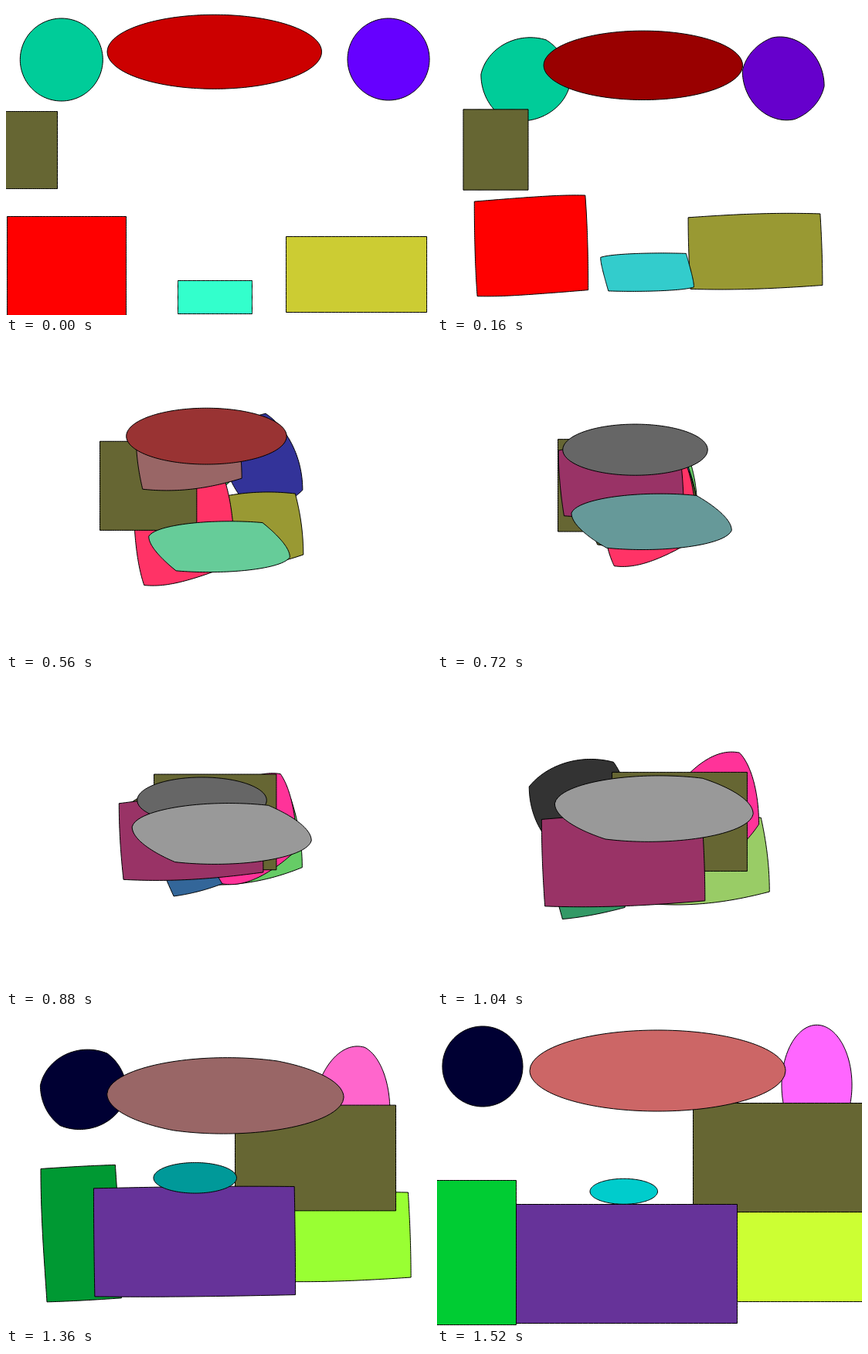
Write an HTML page with a canvas that moves like this. It is 550x400 px and loops after 1.68 s.

```html
<!DOCTYPE html>
<html lang="en">
<head>
<meta charset="utf-8">
<title>Shape morphs</title>
<style>
html, body { margin: 0; width: 100%; height: 100%; overflow: hidden; background: #fff; }
canvas { display: block; }
</style>
</head>
<body>
<canvas id="stage" width="550" height="400"></canvas>
<script>
const ctx = document.getElementById('stage').getContext('2d');
const STEP = 80, LAST = 19, LOOP = 1680, PER_SIDE = 40;

const rect = (l, t, r, b, color) => ({ kind: 'rect', l, t, r, b, color });
const oval = (l, t, r, b, color) => ({ kind: 'oval', l, t, r, b, color });
const mix = (a, b, k) => a + (b - a) * k;

// Start and end of every morph, bottom layer first.
const morphs = [
  [oval(18.3, 16, 125.3, 123, 0x00cc99), rect(385, 251.5, 571, 368.5, 0xccff33)],
  [oval(442, 16, 548, 122, 0x6600ff), rect(-1.7, 211.5, 102.5, 398.5, 0x00cc33)],
  [rect(362.5, 298.5, 544.5, 396.5, 0xcccc33), oval(7, 12, 111, 116, 0x000033)],
  [rect(1.5, 272.5, 155.5, 400.5, 0xff0000), oval(446, 10.3, 537, 166, 0xff66ff)],
  [rect(-1, 136.5, 66.5, 236.5, 0x666633), rect(331.5, 111.5, 556, 252.5, 0x666633)],
  [oval(206.5, 21, 256.5, 71, 0xcc6633), rect(102.5, 242.5, 388.5, 396.5, 0x663399)],
  [oval(131, 11.3, 408.5, 107.3, 0xcc0000), oval(198, 209.3, 285.5, 242.3, 0x00cccc)],
  [rect(222.5, 355.5, 318.5, 398.5, 0x33ffcc), oval(120, 17, 451, 122, 0xcc6666)],
];

// Points clockwise from the top left corner, the same count on each side.
function rectPoints({ l, t, r, b }) {
  const corners = [[l, t], [r, t], [r, b], [l, b]];
  return corners.flatMap(([x, y], i) => {
    const [nx, ny] = corners[(i + 1) % 4];
    return Array.from({ length: PER_SIDE }, (_, j) =>
      [mix(x, nx, j / PER_SIDE), mix(y, ny, j / PER_SIDE)]);
  });
}

// Share of the perimeter covered at each point of rectPoints.
function rectShares({ l, t, r, b }) {
  const split = (r - l) / (r - l + b - t) / 2;
  const stops = [0, split, 0.5, 0.5 + split, 1];
  return Array.from({ length: 4 * PER_SIDE }, (_, i) => {
    const side = Math.floor(i / PER_SIDE);
    return mix(stops[side], stops[side + 1], (i % PER_SIDE) / PER_SIDE);
  });
}

// Points clockwise from the leftmost one, at given shares of the arc length.
function ovalPoints({ l, t, r, b }, shares) {
  const rx = (r - l) / 2, ry = (b - t) / 2, count = 1440;
  const at = i => {
    const angle = Math.PI + 2 * Math.PI * i / count;
    return [l + rx + rx * Math.cos(angle), t + ry + ry * Math.sin(angle)];
  };
  const lengths = [0];
  for (let i = 1; i <= count; i++) {
    const [x, y] = at(i), [px, py] = at(i - 1);
    lengths.push(lengths[i - 1] + Math.hypot(x - px, y - py));
  }
  let i = 0;
  return shares.map(share => {
    const goal = share * lengths[count];
    while (lengths[i + 1] < goal) i++;
    return at(i + (goal - lengths[i]) / (lengths[i + 1] - lengths[i]));
  });
}

const even = Array.from({ length: 4 * PER_SIDE }, (_, i) => i / (4 * PER_SIDE));
const paths = morphs.map(pair => {
  const box = pair.find(shape => shape.kind === 'rect');
  const shares = box ? rectShares(box) : even;
  return pair.map(s => s.kind === 'rect' ? rectPoints(s) : ovalPoints(s, shares));
});

// Colours snap to the six levels of the web palette.
const limits = [32, 80, 128, 192, 240];
function blend(a, b, k) {
  const channels = [16, 8, 0].map(shift => {
    const value = mix(a >> shift & 255, b >> shift & 255, k);
    return 51 * limits.filter(limit => value >= limit).length;
  });
  return `rgb(${channels})`;
}

function draw(now) {
  const k = Math.min(LAST, Math.floor(now % LOOP / STEP)) / LAST;
  ctx.fillStyle = '#fff';
  ctx.fillRect(0, 0, 550, 400);
  ctx.strokeStyle = '#000';
  ctx.lineJoin = 'round';
  morphs.forEach(([from, to], i) => {
    const [start, end] = paths[i];
    ctx.beginPath();
    start.forEach(([x, y], j) => ctx.lineTo(mix(x, end[j][0], k), mix(y, end[j][1], k)));
    ctx.closePath();
    ctx.fillStyle = blend(from.color, to.color, k);
    ctx.fill();
    ctx.stroke();
  });
}

function tick() {
  draw(performance.now());
  requestAnimationFrame(tick);
}
tick();
</script>
</body>
</html>
```
